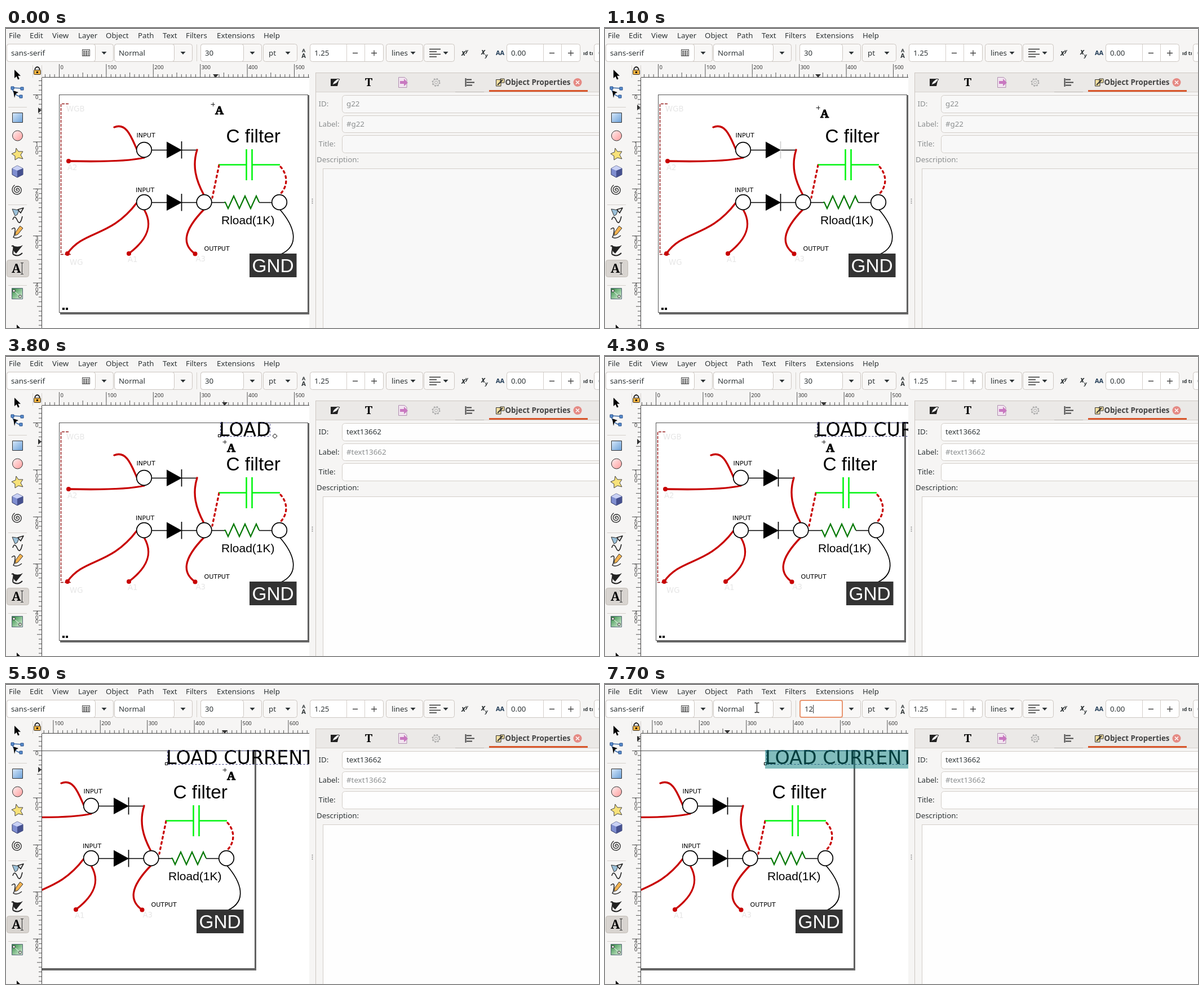
These frames come from a looping animation (1052x532 px, 8 s). An HTML page:

```html
<!DOCTYPE html>
<html lang="en">
<head>
<meta charset="utf-8">
<title>Labelling a circuit drawing</title>
<style>
html, body { margin: 0; width: 100%; height: 100%; overflow: hidden; background: #f6f5f4; }
svg { display: block; width: 1052px; height: 532px; }
text { white-space: pre; }
.ui { font: 13.3px "Noto Sans", "Open Sans", sans-serif; fill: #2e3436; }
.bold { font-weight: 700; }
.slab { font: 900 20px "Noto Serif", serif; fill: #000; }
.tiny { font: 9.5px "Noto Sans", sans-serif; fill: #333; }
.dv { font-family: "DejaVu Sans", sans-serif; }
.lib { font-family: "Liberation Sans", Arial, sans-serif; }
.pale { font-size: 13.3px; fill: #e6e6e6; }
.box { fill: #fff; stroke: #cdc7c2; }
.btn { fill: #f9f8f7; stroke: #cdc7c2; }
.wire { fill: none; stroke: #000; stroke-width: 1.7; }
.red { fill: none; stroke: #c80000; stroke-width: 3.3; stroke-linecap: round; }
.dots { stroke-dasharray: 3.5 6; }
.dot { fill: #c80000; }
.ring { fill: #fff; stroke: #000; stroke-width: 1.7; }
.green { fill: none; stroke: #00f510; stroke-width: 2.6; }
.off { fill: #8b8e8f; }
.field { fill: #f8f8f8; stroke: #d3cec9; }
.on .field { fill: #fefefe; }
.on .cap { fill: #2e3436; }
.line { stroke: #d5d0cc; fill: none; }
</style>
</head>
<body>
<svg viewBox="0 0 1052 532">
<defs>
  <clipPath id="view"><rect x="64" y="88" width="474" height="444"/></clipPath>
  <clipPath id="top"><rect x="64" y="62" width="474" height="26"/></clipPath>
  <linearGradient id="blue" x2="1" y2="1"><stop stop-color="#d8e9fa"/><stop offset="1" stop-color="#6ba0d8"/></linearGradient>
  <linearGradient id="pink" x2="1" y2="1"><stop stop-color="#fff0f0"/><stop offset="1" stop-color="#ff9c9c"/></linearGradient>
  <linearGradient id="leaf" x2="1" y2="1"><stop stop-color="#2c8a3e"/><stop offset="1" stop-color="#e4f6e4"/></linearGradient>
  <path id="arrow" d="M0 0V15L3.6 11.8 6.2 17.5 8.8 16.3 6.2 10.8H11Z"/>
</defs>
<rect width="1052" height="532" fill="#f6f5f4"/>
<rect width="1052" height="1" fill="#222"/>
<g id="menu" class="ui"></g>
<g id="bar" class="ui"></g>

<g id="tools" stroke-linejoin="round">
  <path class="line" d="M4 140.5H37M4 313.5H37M4 456.5H37"/>
  <rect x="1.5" y="411.5" width="39" height="30" rx="4" fill="#d8d4d0" stroke="#c4beb8"/>
  <use href="#arrow" x="15" y="74"/>
  <path d="M11 106Q13 119 26 122M11 106L29 107" fill="none" stroke="#3465a4" stroke-width="1.5"/>
  <path d="M13 111L22 114 17 117 15 124Z"/>
  <path d="M9 104h5v5h-5zM26 105h5v5h-5zM24 119h5v5h-5z" fill="#5b8fd0" stroke="#204a87"/>
  <rect x="11.500" y="150.500" width="18" height="17" fill="url(#blue)" stroke="#333"/>
  <circle cx="20.500" cy="191" r="9" fill="url(#pink)" stroke="#333"/>
  <path d="M18 213L22 219 30 219 26 225 30 232 22 230 16 234 16 227 10 223 17 220Z" fill="#f8e27a" stroke="#444"/>
  <path d="M20 244L30 249V260L20 265 11 260V249Z" fill="#7f8ed0" stroke="#333a66"/>
  <path d="M11 249L20 253 30 249 20 244Z" fill="#c9d1f4"/><path d="M20 253V265L30 260V249Z" fill="#45508f"/>
  <path id="spiral" fill="none" stroke="#333" stroke-width="1.4"/>
  <path d="M11 321L23 323 20 331 16 333Z" fill="#9bc0d8" stroke="#333"/><path d="M21 322L31 319 26 328ZM12 340Q15 330 20 341T29 334" fill="none" stroke="#222" stroke-width="1.6"/>
  <path d="M17 362L25 351 30 355 21 366 16 368Z" fill="#f4b350" stroke="#333"/><path d="M10 357Q17 351 16 360T13 371Q19 375 28 368" fill="none" stroke="#222" stroke-width="1.5"/>
  <path d="M12 386Q22 390 30 385L22 395 18 400 14 396Z" fill="#222"/><path d="M10 387Q15 384 13 393T14 402Q22 406 29 399" fill="none" stroke="#222" stroke-width="2"/>
  <text class="slab" x="10" y="434" style="font-size:22px">A</text><path d="M28.500 417V436M26 416.500H31M26 436.500H31" stroke="#333"/>
  <rect x="10.500" y="461.500" width="19" height="19" fill="url(#leaf)" stroke="#567"/>
  <path d="M14 466L25 476" stroke="#fff"/><path d="M12 464h4v4h-4zM23 474h4v4h-4z" fill="#fff" stroke="#333"/>
  <path d="M19 526L25 532H19Z"/>
  <path d="M47.500 66V88M63.500 66V88" class="line"/>
  <path d="M51.500 75V72Q55.500 66 59.500 72V75" fill="none" stroke="#222" stroke-width="1.8"/>
  <rect x="49.500" y="74.500" width="12" height="8" rx="1" fill="#f0b040" stroke="#333"/><rect x="54" y="77" width="3" height="3"/>
</g>

<g clip-path="url(#top)"><g id="rulerX" class="tiny"></g></g>
<g id="rulerY" class="tiny"></g>
<path d="M64 87.500H538M63.500 88V532" stroke="#444"/>
<path id="markX" d="M-5 -3H5L0 3Z" fill="#333"/>
<path id="markY" d="M-3 -5V5L3 0Z" fill="#333"/>

<g clip-path="url(#view)">
  <rect x="64" y="88" width="474" height="444" fill="#fff"/>
  <g id="page">
    <path d="M535 119H538V508H96V505H535Z" fill="#666"/>
    <rect x="94.500" y="118.500" width="441" height="386" fill="#fff" stroke="#555"/>
    <path d="M111 134.500H97.500V401.500H115" fill="none" stroke="#982020" stroke-width="1.6" stroke-dasharray="5 2"/>
    <g class="dv pale">
      <text x="107" y="148">WGB</text><text x="109" y="252">A2</text><text x="113" y="420">WG</text>
      <text x="216" y="414.500">A1</text><text x="336.500" y="414">A3</text>
    </g>
    <g class="dv" font-size="11.1">
      <text x="231.500" y="194">INPUT</text><text x="230" y="291">INPUT</text><text x="351.500" y="394.500">OUTPUT</text>
    </g>
    <g id="diodes"></g>
    <path class="wire" d="M365 309.500H388M449 309.500H472M486 322C512 352 522 385 488 401"/>
    <path class="red" d="M192 176C214 167 223 195 232 215M111 236C155 237 215 237 245 230M339 216C330 245 337 270 351 296M109 400C138 358 185 372 232 310M245 322C258 344 258 370 218 400M351 322C312 362 314 385 335 400"/>
    <path class="red dots" d="M378 243L366 301M487 246C499 259 502 280 485 296"/>
    <g class="dot"><circle cx="111" cy="236" r="4"/><circle cx="109" cy="400" r="4"/><circle cx="218" cy="400" r="4"/><circle cx="335.500" cy="400.500" r="4"/></g>
    <g class="ring"><circle cx="245" cy="216" r="13.300"/><circle cx="245" cy="309" r="13.300"/><circle cx="351.500" cy="309" r="13.300"/><circle cx="485" cy="309" r="13.300"/></g>
    <path class="green" d="M378 242.500H426M436 242.500H486M426.500 215V270M436.500 215V270"/>
    <path d="M387 309H389L394 320 404 298 414 320 424 298 434 320 444 298 449 309" fill="none" stroke="#087a08" stroke-width="2.200"/>
    <text class="lib" x="390.500" y="203" font-size="33.360">C filter</text>
    <text class="lib" x="382" y="347.500" font-size="21">Rload(1K)</text>
    <rect x="432" y="400" width="83.500" height="42" fill="#333"/>
    <text class="lib" x="436.500" y="433" font-size="33.360" fill="#fff">GND</text>
    <path d="M100 496h4v4h-4zM106 496h4v4h-4z"/>
    <g id="typed">
      <text id="word" class="dv" x="378" y="142" font-size="33.360"></text>
      <rect id="frame" x="380.500" y="118.500" height="24" fill="none" stroke="#3c3c80" stroke-dasharray="3 3"/>
      <rect x="376.500" y="139.500" width="4" height="4" fill="#fff" stroke="#000"/>
      <path id="knob" d="M0 -4L4 0 0 4 -4 0Z" fill="#fff" stroke="#000"/>
      <rect id="pick" x="378" y="117" width="280" height="33" fill="rgb(7,125,125)" fill-opacity=".5"/>
    </g>
    <rect id="caret" width="1.200"/>
  </g>
  <g id="pen">
    <path d="M-3.500 .5H3.500M.5 -3V4" stroke="#222"/>
    <text class="slab" x="5" y="19" fill="#888" opacity=".35">A</text>
    <text class="slab" x="4" y="18" stroke="#fff" stroke-width="2.500" paint-order="stroke">A</text>
    <text class="slab" x="4" y="18" stroke="#000" stroke-width=".8">A</text>
  </g>
</g>

<g fill="#888"><circle cx="543.500" cy="303.500" r="1"/><circle cx="543.500" cy="307" r="1"/><circle cx="543.500" cy="310.500" r="1"/></g>
<g id="panel" class="ui">
  <rect x="549.500" y="79.500" width="510" height="460" fill="#f6f5f4" stroke="#cdc7c2"/>
  <rect x="550" y="80" width="502" height="33" fill="#ebe9e7"/>
  <path class="line" d="M550 113.500H1052"/>
  <path d="M797 113.500H848" stroke="#b8b4b0"/><rect x="857" y="110" width="175" height="3" fill="#d9562a"/>
  <path d="M576 90H591L588 103H576Z" fill="#222"/><path d="M579 101L581 96 588 90 592 91 586 98Z" fill="#fff" stroke="#222"/>
  <text class="slab" x="643.500" y="103" text-anchor="middle">T</text>
  <path d="M696.500 87.500H707L711 91V105.500H696.500Z" fill="#f2e4f0" stroke="#b090b0"/><path d="M699 94H706V90L713 97 706 103V99H699Z" fill="#c878c0"/>
  <g fill="none" stroke="#aaa"><circle cx="763" cy="96.500" r="2.500"/><circle cx="763" cy="96.500" r="5.500"/><circle cx="763" cy="96.500" r="6.500" stroke-width="2" stroke-dasharray="2.500 2.600"/></g>
  <path d="M815.500 89V104M817 91.500H826M817 96.500H831M817 101.500H827" stroke="#444" stroke-width="2" fill="none"/>
  <path d="M869.500 91.500H878V103H869.500ZM877 90H884V97H877Z" fill="#f3dfa0" stroke="#333"/><path d="M872 101L881 92" stroke="#333" stroke-width="2"/>
  <text class="bold" x="885.500" y="101" fill="#444">Object Properties</text>
  <circle cx="1014" cy="96.500" r="7.500" fill="#e58a84"/><path d="M1011 93.500L1017 99.500M1017 93.500L1011 99.500" stroke="#fff" stroke-width="1.500"/>
  <g class="field">
    <rect x="596.500" y="119.500" width="480" height="31" rx="5"/><rect x="596.500" y="155.500" width="480" height="30" rx="5"/>
    <rect x="596.500" y="190.500" width="480" height="31" rx="5"/><rect x="562.500" y="249.500" width="510" height="300"/>
  </g>
  <g class="off cap"><text x="554.500" y="139">ID:</text><text x="554.500" y="175">Label:</text><text x="554.500" y="210">Title:</text><text x="551" y="238">Description:</text></g>
  <text id="objId" class="off cap" x="604" y="139"></text>
  <text id="objLabel" class="off" x="604" y="175"></text>
</g>

<g id="sizeEdit" class="ui">
  <rect x="346" y="29" width="75" height="30" rx="3" fill="#fff" stroke="#e8956f" stroke-width="2"/>
  <rect id="sizePick" x="353" y="36" width="17" height="17" fill="#e95420"/>
  <text id="size" x="354" y="49"></text>
  <rect id="sizeCaret" y="37" width="1" height="15"/>
</g>
<use id="mouse" href="#arrow" stroke="#fff" paint-order="stroke" stroke-width="2"/>
<path id="beam" d="M-3.500 -8.500H-1L.5 -7.500 2 -8.500H4.500M.5 -7.500V7.500M-3.500 8.500H-1L.5 7.500 2 8.500H4.500" fill="none" stroke="#222" stroke-width="1.300"/>
</svg>
<script>
const $ = id => document.getElementById(id);
const add = (id, markup) => $(id).insertAdjacentHTML('beforeend', markup);
const label = (x, y, s, attrs = '') => `<text x="${x}" y="${y}" ${attrs}>${s}</text>`;
const box = (x, w, kind) => `<rect class="${kind}" x="${x + .5}" y="28.5" width="${w}" height="31" rx="4"/>`;
const tri = x => `<path d="M${x - 4.5} 42H${x + 4.5}L${x} 47Z"/>`;
const rule = x => `<path class="line" d="M${x}.5 29V59"/>`;

const menu = { File: 5, Edit: 42, View: 82, Layer: 128, Object: 177, Path: 234, Text: 278, Filters: 319, Extensions: 374, Help: 457 };
for (const name in menu) add('menu', label(menu[name], 17.5, name));

const combo = (x, split, w, s) => box(x, w, 'btn') + box(x, split, 'box') + label(x + 8, 49, s) + tri(x + split + 16);
const spin = (x, s) => box(x, 130, 'box') + label(x + 8, 49, s) + rule(x + 65) + rule(x + 97) +
  `<path d="M${x + 76} 44.5H${x + 85}M${x + 109} 44.5H${x + 119}M${x + 114} 39.5V49.5" stroke="#444" stroke-width="1.3"/>`;
add('bar', combo(1, 157, 189, 'sans-serif') + combo(192, 106, 138, 'Normal') + rule(338) + combo(345, 76, 108, '30') +
  '<rect x="135.500" y="38.500" width="13" height="11" fill="none" stroke="#444"/><path d="M137 41.500H147M137 44.500H147M137 47.500H147" stroke="#444" stroke-width="2" stroke-dasharray="3 1"/>' +
  box(456, 60, 'btn') + label(466, 49, 'pt') + tri(500) +
  '<g class="bold">' + label(528, 43, 'A', 'font-size="9" text-anchor="middle"') + label(528, 53, 'A', 'font-size="11" text-anchor="middle"') + '</g>' +
  spin(539, '1.25') + box(674, 65, 'btn') + label(684, 49, 'lines') + tri(722) +
  box(741, 54, 'btn') + tri(780) + '<path d="M751 37.500H771M751 42H764M751 46.500H771M751 51H764" stroke="#333" stroke-width="1.600"/>' +
  '<g class="bold" font-style="italic">' + label(808, 49, 'x') + label(815, 44, 'y', 'font-size="9"') + label(843, 47, 'x') + label(850, 52, 'y', 'font-size="9"') + '</g>' +
  label(869, 48, 'AA', 'class="bold" font-size="11" fill="#1f3a55" textLength="0"'.replace(' textLength="0"', '')) +
  spin(888, '0.00') + label(1024, 48, 'ıd tı', 'class="bold" style="font-size:9px"') + box(1043, 40, 'box') + label(1051, 49, '0'));

let spiral = 'M20 287';
for (let a = 0; a < 17; a += .3) spiral += `L${(20 + a * .57 * Math.cos(a)).toFixed(1)} ${(287 + a * .57 * Math.sin(a)).toFixed(1)}`;
$('spiral').setAttribute('d', spiral);

// Rulers: one unit is .834 pixels.
const UNIT = .834;
for (let u = -40; u <= 800; u += 10) {
  const x = 94.5 + u * UNIT, y = 118.5 + u * UNIT;
  const len = u % 100 === 0 ? 23 : u % 50 === 0 ? 8 : 5;
  add('rulerX', `<path d="M${x} ${87 - len}V87" stroke="#555"/>`);
  if (u % 100 === 0) add('rulerX', label(x + 2, 73, u));
  if (y < 88 || y > 532) continue;
  add('rulerY', `<path d="M${63 - Math.min(len, 15)} ${y}H63" stroke="#555"/>`);
  if (u % 100 === 0) [...String(u)].forEach((d, i) => add('rulerY', label(52, y + 7 + i * 7.5, d)));
}

for (const y of [216, 309]) add('diodes',
  `<path class="wire" d="M258 ${y}.5H285M311 ${y}.5H339"/><path class="wire stop" d="M311.5 ${y - 15}V${y + 15.500}"/><path d="M285 ${y - 14.5}V${y + 15}L312 ${y + .5}Z"/>`);
const stop = document.querySelector('.stop');

// Each step: time, then the values that hold from then on.
const path = [[0, 367, 135], [900, 376, 140], [1100, 378, 141], [1200, 379, 142], [1300, 379, 142], [1700, 388, 152]];
const typing = [[0, 0, 0], [2400, 1, 0], [2500, 2, 0], [2600, 3, 0], [2700, 4, 0], [2900, 5, 0], [4000, 6, 0], [4200, 7, 0],
  [4300, 8, -4], [4500, 9, -27], [4600, 10, -48], [4900, 11, -71], [5500, 12, -94]];
const mouse = [[6300, 137, 12], [6700, 309, 41], [7000, 374, 44], [7100, 362, 44], [7200, 338, 43], [7300, 304, 42], [7400, 269, 42]];
const sizes = [[0, '30'], [7500, ''], [7600, '1'], [7700, '12']];
const WORD = 'LOAD CURRENT';

const held = (steps, t) => steps.filter(s => s[0] <= t).pop();
function along(steps, t) {
  const i = steps.findIndex(s => s[0] > t);
  if (i < 0) return steps[steps.length - 1].slice(1);
  const [a, b] = [steps[i - 1], steps[i]], k = (t - a[0]) / (b[0] - a[0]);
  return [1, 2].map(n => Math.round(a[n] + (b[n] - a[n]) * k));
}
const show = (id, on) => $(id).style.display = on ? '' : 'none';
const move = (id, x, y) => $(id).setAttribute('transform', `translate(${x} ${y})`);
const set = (id, attrs) => { for (const k in attrs) $(id).setAttribute(k, attrs[k]); };

function draw(t) {
  const [x, y] = along(path, t), away = t >= 6300;
  show('pen', !away);
  move('pen', x, y);
  move('markX', away ? 217 : t < 100 ? 372 : x, 85);
  move('markY', 60, away ? 97 : t < 100 ? 146 : y);
  stop.style.stroke = t >= 200 && t < 1200 ? '#d0d0d0' : '#000';

  const [, count, shift] = held(typing, t);
  move('page', shift, 0);
  move('rulerX', shift, 0);
  show('typed', count);
  $('word').textContent = WORD.slice(0, count);
  const end = count ? 378 + $('word').getComputedTextLength() : 378;
  set('frame', { width: Math.max(1, Math.round(end - (count === 5 ? 11 : 0)) - 381) });
  move('knob', Math.round(end - 3), 142);
  show('pick', t >= 6000);
  set('caret', { x: Math.round(end) - .5, y: count ? 117 : 108, height: count ? 33 : 34 });
  show('caret', t >= 2100 && !(t >= 2400 && t < 2500) && !(t >= 3800 && t < 4000) && t < 6000);

  const made = t >= 2400;
  $('panel').classList.toggle('on', made);
  $('objId').textContent = made ? 'text13662' : 'g22';
  $('objLabel').textContent = made ? '#text13662' : '#g22';

  const editing = t >= 7000, size = held(sizes, t)[1], picked = t >= 7200 && t < 7500;
  show('sizeEdit', editing);
  $('size').textContent = size;
  $('size').style.fill = picked ? '#fff' : '';
  show('sizePick', picked);
  show('sizeCaret', !picked);
  set('sizeCaret', { x: 354 + size.length * 7.6 });

  const m = held(mouse, t), beam = editing;
  show('mouse', m && !beam);
  show('beam', m && beam);
  if (m) move(beam ? 'beam' : 'mouse', m[1], m[2]);
}

const start = performance.now();
function tick(now) {
  const t = Math.max(0, now - start) % 8000;
  draw(Math.floor(t / 100) * 100);
  requestAnimationFrame(tick);
}
draw(0);
requestAnimationFrame(tick);
</script>
</body>
</html>
```
